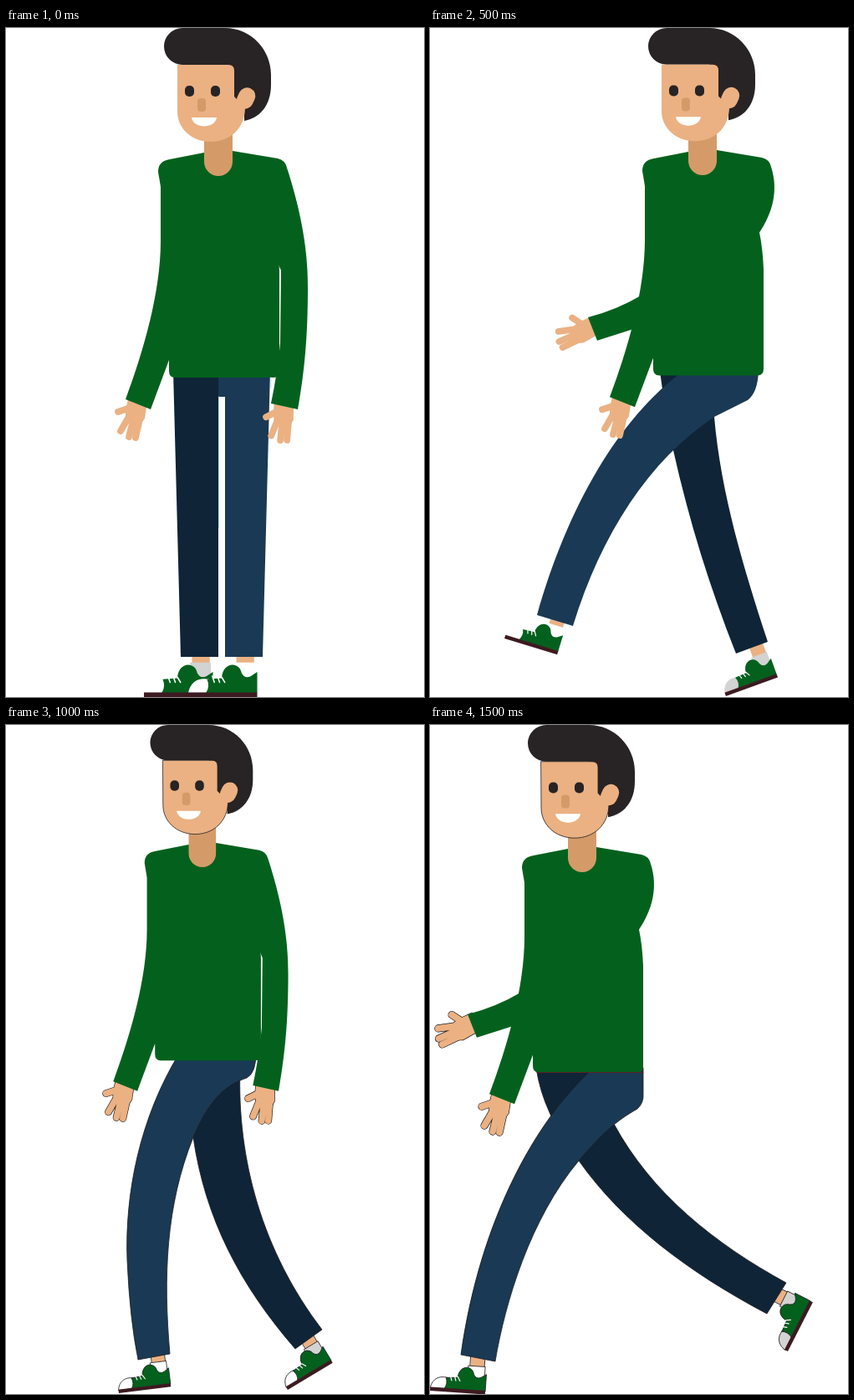
Animation, 500 px wide and 800 px high, one loop 2 s. Source, as an HTML page with a canvas:

```html
<!DOCTYPE html>
<html lang="en">
<head>
<meta charset="utf-8">
<title>Walking man</title>
<style>
  html, body { margin: 0; height: 100%; overflow: hidden; background: #fff; }
  canvas { display: block; }
</style>
</head>
<body>
<canvas id="stage" width="500" height="800"></canvas>
<script>
const ctx = document.getElementById('stage').getContext('2d');
const GREEN = '#03611d', SKIN = '#ebb182', SHADE = '#d49b69', HAIR = '#282324';
const NEAR = '#1a3954', FAR = '#0f2437', SOLE = '#3c1a20', GREY = '#d3d3d3', WHITE = '#fff';
const OUTLINE = '#1c1c20';

// Each pose: body transform, arm swing, trouser shapes, shoes [x, y, degrees, size, sock, toe].
const poses = [
  {
    body: [1, 1, 0, 0], swing: false,
    far: 'M200 410H254V752H209Z',
    near: 'M254 410H316L307 752H262V441H254Z',
    shoes: [[165, 800, 0, 1.25, GREY, WHITE], [218, 800, 0, 1.25, WHITE, WHITE]],
    trim: ['M254.5 441V597M317 418V430', '#b5e8f3']
  },
  {
    body: [1, .994, 72, 0], swing: true,
    far: 'M275 410H340V465C348 557 375 645 404 734L366 748C335 670 310 590 291 505Q280 450 275 410Z',
    near: 'M303 410C225 468 165 572 128 702L171 715C205 605 262 517 340 465L380 445Q392 436 393 410Z',
    shoes: [[354, 799, -20, 1, GREY, GREY], [89, 730, 17, 1, WHITE, WHITE]]
  },
  {
    body: [.96, .96, -9, 0], swing: false, edge: true,
    far: 'M280 410C276 520 307 630 378 723L346 746C280 670 238 590 224 493L250 420Z',
    near: 'M207 393C160 470 142 560 145 640Q148 710 158 759L196 752C188 660 191 575 224 493C245 444 265 430 288 422Q299 416 299 393Z',
    shoes: [[337, 795, -31, .95, GREY, WHITE], [135, 799, -7, .95, WHITE, WHITE]]
  },
  {
    body: [1, .994, -72, 0], swing: true, edge: true,
    far: 'M127 410H210L220 477C265 560 340 620 426 667L403 704C310 655 230 595 178 521Q135 465 127 410Z',
    near: 'M196 410C128 470 60 590 37 753L78 761C90 690 120 590 178 521C205 490 220 475 248 459Q256 452 255 440V410Z',
    shoes: [[428, 749, -63, 1, GREY, GREY], [0, 796, 4, 1, WHITE, WHITE]],
    trim: ['M128 415.5H255', '#5b2222']
  }
];

function fill(color, path, edge) {
  ctx.fillStyle = color;
  ctx.fill(new Path2D(path));
  if (edge) line(OUTLINE, .8, path);
}

function line(color, width, path) {
  ctx.strokeStyle = color;
  ctx.lineWidth = width;
  ctx.stroke(new Path2D(path));
}

function pill(color, x, y, w, h, r) {
  ctx.fillStyle = color;
  ctx.beginPath();
  ctx.roundRect(x, y, w, h, r);
  ctx.fill();
}

function at(x, y, degrees, scale, draw) {
  ctx.save();
  ctx.translate(x, y);
  ctx.rotate(degrees * Math.PI / 180);
  ctx.scale(scale, scale);
  draw();
  ctx.restore();
}

function shoe([x, y, degrees, size, sock, toe], edge) {
  at(x, y, degrees, size, () => {
    fill(SKIN, 'M46 -47H63V-30H46Z', edge);
    fill(sock, 'M44 -33H64V-12H44Z', edge);
    fill(toe, 'M0 -4C2 -15 10 -19 20 -17V-4Z', edge);
    fill(GREEN, 'M17 -4Q21 -10 18 -17L32 -18C33 -34 49 -34 51 -23Q54 -17 60 -20L66 -24V-4Z', edge);
    line(WHITE, 1.2, 'M23 -20L25 -14M28 -20L30 -14M32 -19L35 -14');
    fill(SOLE, 'M0 -4.5H66V0H0Z');
  });
}

function hand(x, y, degrees, edge) {
  const palm = 'M-10 -14L12 -6L9 14L3 22L-14 16L-14 4Z';
  const fingers = 'M-8 1L-23 6M-9 10L-20 29M-4 12L-10 36M4 10L-2 37';
  at(x, y, degrees, 1, () => {
    if (edge) {
      line(OUTLINE, 9.2, fingers);
      line(OUTLINE, 1.4, palm);
    }
    fill(SKIN, palm);
    line(SKIN, 7.8, fingers);
  });
}

function head(edge) {
  fill(HAIR, 'M211 0H262C293 0 317 26 317 56V68C317 93 303 108 285 111V60H273V44H211A22 22 0 0 1 211 0Z');
  fill(HAIR, 'M262 40H300V100H262Z');
  fill(SKIN, 'M205 44H266Q273 44 273 51V82L286 95C286 120 268 136 245 136C222 136 205 120 205 100Z', edge);
  at(287, 84, 25, 1, () => pill(SKIN, -10, -13, 20, 26, 10));
  pill(HAIR, 214, 69, 11, 13, 5);
  pill(HAIR, 245, 69, 11, 13, 5);
  pill(SHADE, 229, 84, 10, 16, 4);
  fill(WHITE, 'M222 107H252C250 121 224 121 222 107Z');
}

function upperBody({ swing, edge }) {
  hand(157, 453, 0, edge);
  if (swing) hand(117, 363, 52, edge);
  else hand(333, 456, -8, edge);
  fill(GREEN, 'M237 149L196 157Q182 159 182 172L185 190V255C185 315 165 385 143 444L173 456L195 397V410Q195 418 202 418H320Q327 418 327 410V290Q326 265 322 246L336 167Q334 158 325 156L271 147Z');
  if (swing) {
    fill(GREEN, 'M336 167C345 195 338 222 322 246L300 200Z');
    fill(GREEN, 'M117 348Q150 340 182 321L195 350L172 362L128 376Z');
  } else {
    fill(GREEN, 'M336 167C358 235 361 280 361 310C361 370 357 410 349 456L317 449C322 425 326 400 328 377L329 290L310 246Z');
  }
  pill(SHADE, 237, 120, 34, 57, [0, 0, 17, 17]);
  head(edge);
}

function drawPose(pose) {
  ctx.fillStyle = WHITE;
  ctx.fillRect(0, 0, 500, 800);
  shoe(pose.shoes[0], pose.edge);
  fill(FAR, pose.far, pose.edge);
  shoe(pose.shoes[1], pose.edge);
  fill(NEAR, pose.near, pose.edge);
  const [sx, sy, dx, dy] = pose.body;
  ctx.save();
  ctx.transform(sx, 0, 0, sy, dx, dy);
  upperBody(pose);
  ctx.restore();
  if (pose.trim) line(pose.trim[1], 1, pose.trim[0]);
}

ctx.lineCap = 'round';
const start = performance.now();
function tick() {
  const time = (performance.now() - start) % 2000;
  drawPose(poses[Math.floor(time / 500)]);
  requestAnimationFrame(tick);
}
tick();
</script>
</body>
</html>
```
